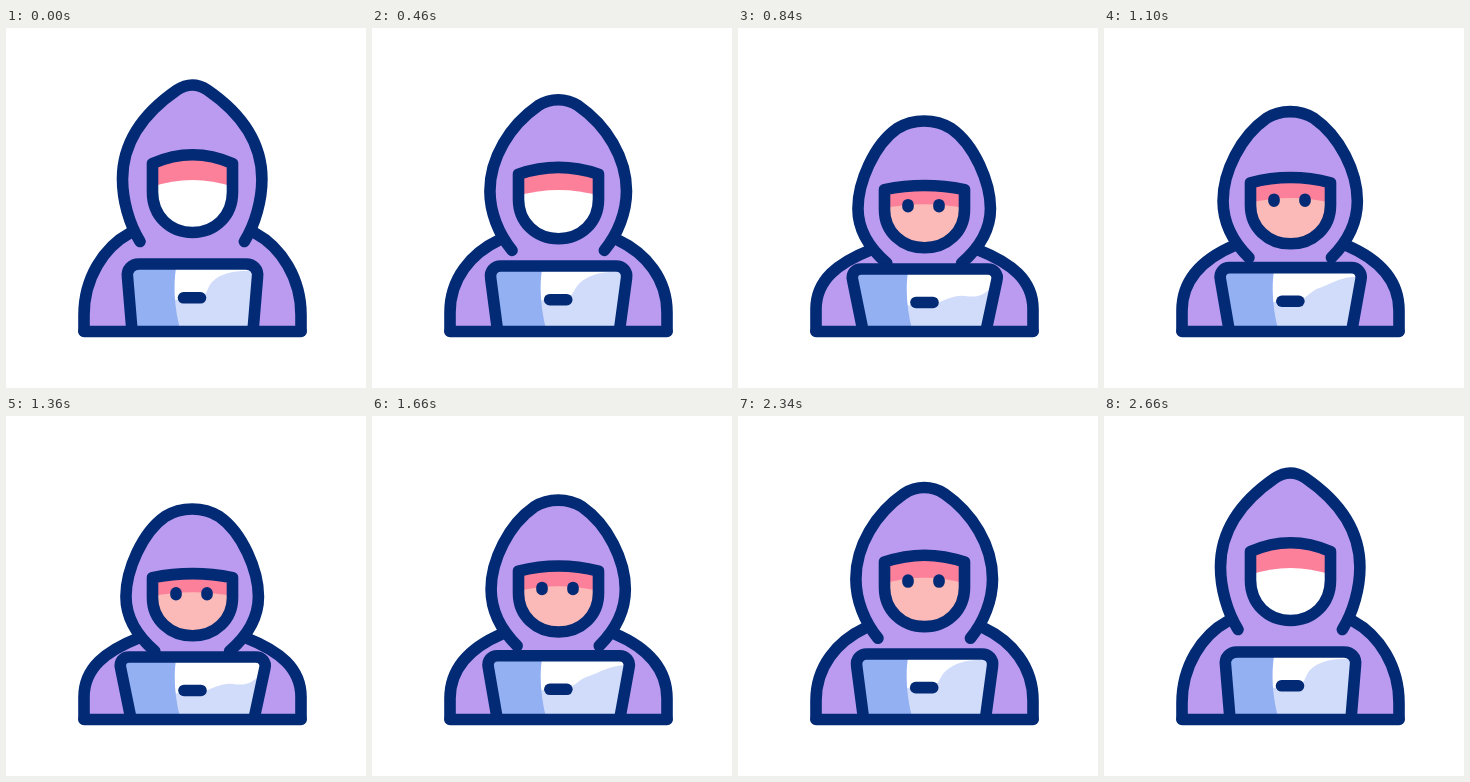
An HTML page for the animation above (3000 ms loop, 360 px wide and 360 px high).

```html
<!DOCTYPE html>
<html lang="en">
<head>
<meta charset="utf-8">
<title>Hooded figure at a laptop</title>
<style>
  html, body { margin: 0; width: 100%; height: 100%; overflow: hidden; background: #fff; }
  svg { display: block; width: 100%; height: 100%; }
  .line { fill: none; stroke: #032a75; stroke-width: 11.6; stroke-linecap: round; stroke-linejoin: round; }
  .cloth { fill: #ba9bf0; }
</style>
</head>
<body>
<svg viewBox="0 0 360 360">
  <defs>
    <clipPath id="faceClip"><path data-shape="face"/></clipPath>
    <clipPath id="lidClip"><path data-shape="lid"/></clipPath>
  </defs>

  <path class="cloth" data-shape="body"/>
  <path class="line" data-shape="shoulders"/>
  <path class="cloth" data-shape="hood"/>
  <path class="line" data-shape="hood"/>

  <g clip-path="url(#faceClip)">
    <rect x="140" y="110" width="94" height="120" fill="#fd809b"/>
    <path id="skin" data-shape="skin"/>
  </g>
  <path id="eyes" data-shape="eyes" class="line"/>
  <path class="line" data-shape="face"/>

  <g clip-path="url(#lidClip)">
    <rect x="100" y="230" width="175" height="75" fill="#d0dcfa"/>
    <path data-shape="glare" fill="#fff"/>
    <path data-shape="shade" fill="#92b0f2"/>
  </g>
  <path class="line" data-shape="lid"/>
  <path class="line" data-shape="badge"/>
  <path class="line" d="M78 303.5H295"/>
</svg>
<script>
  const LOOP = 3000;
  const FACE_ON = 620, FACE_OFF = 2480;

  // Each shape: upright pose, crouched pose
  const shapes = {
    body: [
      'M78 303V287C78 250 98 219 124 205L249 205C275 219 295 250 295 287V303Z',
      'M78 303V281C78 252 100 235 133 222L240 222C273 235 295 252 295 281V303Z'
    ],
    shoulders: [
      'M78 303V287C78 250 98 219 124 205M249 205C275 219 295 250 295 287V303',
      'M78 303V281C78 252 100 235 133 222M240 222C273 235 295 252 295 281V303'
    ],
    hood: [
      'M134 213.5C123 196 116.5 172 116.5 151C116.5 113 139 84 171 62C176 58.7 181 57 186.2 57' +
      'C191.4 57 196.4 58.7 201.4 62C233.4 84 255.9 113 255.9 151C255.9 172 249.4 196 238.4 213.5',
      'M149 235.5C132 221 120 203 120 181C120 155 136 117 159 101C167 96 176 93.5 186.2 93.5' +
      'C196.4 93.5 205.4 96 213.4 101C236.4 117 252.4 155 252.4 181C252.4 203 240.4 221 223.4 235.5'
    ],
    face: [
      'M146.5 135.5Q186.5 118 226.5 135.5V164C226.5 188 209 204.5 186.5 204.5C164 204.5 146.5 188 146.5 164Z',
      'M146.5 162Q186.5 154 226.5 162V182C226.5 204 209 220 186.5 220C164 220 146.5 204 146.5 182Z'
    ],
    skin: [
      'M140 161Q186.5 143 233 161V230H140Z',
      'M140 182Q186.5 171 233 182V230H140Z'
    ],
    eyes: [
      'M170 155.5V157.5M201 155.5V157.5',
      'M170 177V179M201 177V179'
    ],
    lid: [
      'M126 303L121.5 249C120.5 241 126 236 133 236H240C247 236 252.5 241 251.5 249L247 303',
      'M125 303L114.5 252C113 246 117 241 123 241H250C256 241 260.5 246 259 252L248 303'
    ],
    glare: [
      'M165 230H246V243C230 242 215 245 206 254C201 260 201 267 195 270L165 272Z',
      'M165 230H264V258C248 260 250 271 232 269C218 266 208 272 198 276L165 278Z'
    ],
    shade: [
      'M100 230H172C167 250 167 276 175 305H100Z',
      'M100 230H173C167 250 167 276 175 305H100Z'
    ],
    badge: [
      'M177.5 269.8H194.5',
      'M178 274.5H195'
    ]
  };

  // [time, crouch amount]
  const poses = [
    [0, 0], [200, 0], [800, 1], [1100, .73], [1400, 1],
    [1700, .73], [2000, 1], [2600, 0], [LOOP, 0]
  ];

  const smooth = x => x * x * (3 - 2 * x);

  function crouchAt(t) {
    const i = poses.findIndex(p => p[0] > t);
    const [t0, a] = poses[i - 1], [t1, b] = poses[i];
    return a + (b - a) * smooth((t - t0) / (t1 - t0));
  }

  const number = /\d+(?:\.\d+)?/g;

  function morph([from, to], k) {
    const ends = to.match(number);
    let i = 0;
    return from.replace(number, n => (+n + (ends[i++] - n) * k).toFixed(2));
  }

  const parts = [...document.querySelectorAll('[data-shape]')];
  const skin = document.getElementById('skin');
  const eyes = document.getElementById('eyes');

  function draw(t) {
    const k = crouchAt(t);
    for (const el of parts) {
      const name = el.dataset.shape;
      // The glare spreads only near the bottom of the crouch
      el.setAttribute('d', morph(shapes[name], name === 'glare' ? k ** 3 : k));
    }
    const shown = t >= FACE_ON && t < FACE_OFF;
    skin.setAttribute('fill', shown ? '#fbbab7' : '#fff');
    eyes.style.display = shown ? '' : 'none';
  }

  const start = performance.now();
  function tick() {
    draw((performance.now() - start) % LOOP);
    requestAnimationFrame(tick);
  }
  tick();
</script>
</body>
</html>
```
